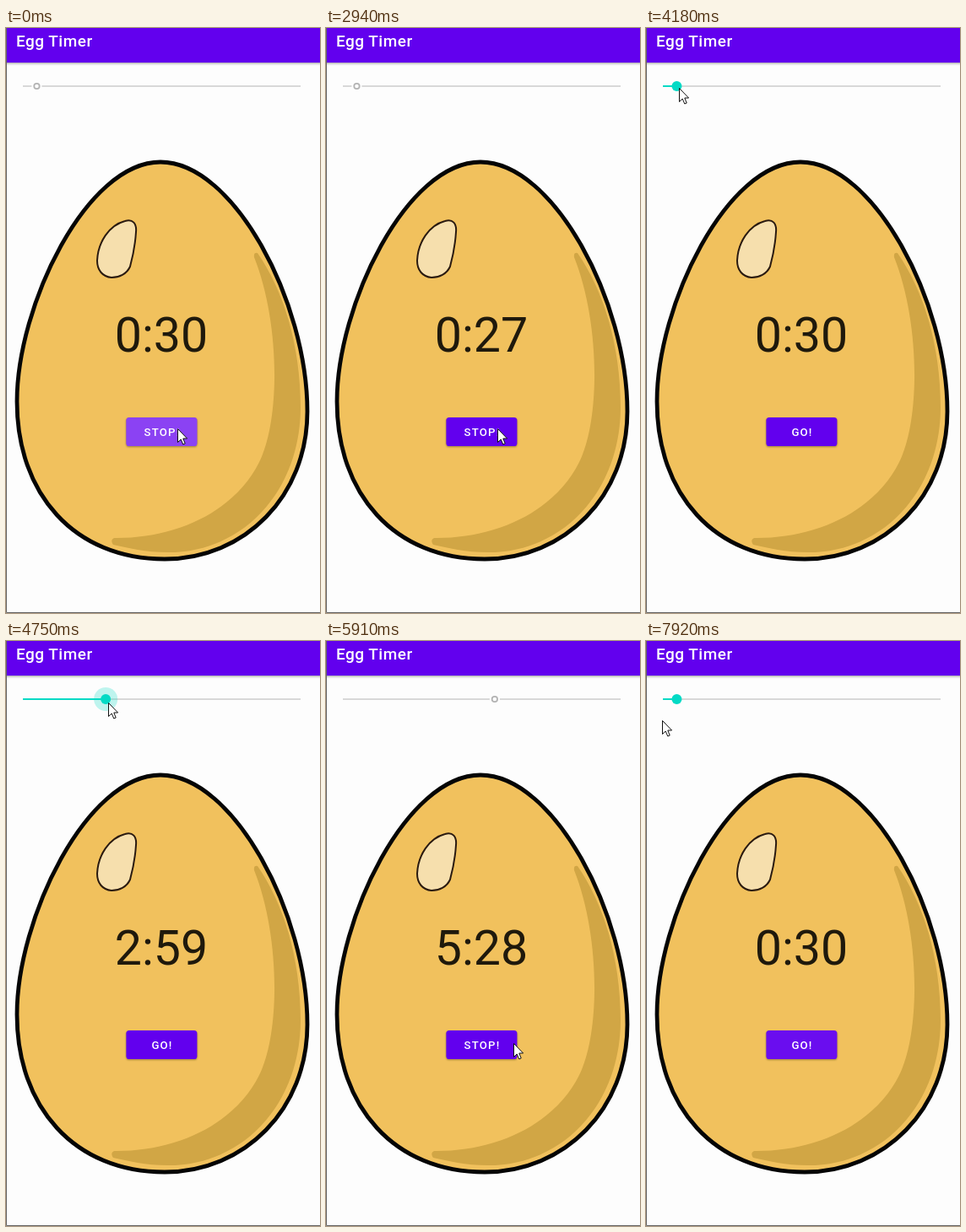
Recreate the animation shown at these times as an HTML page. Size 372 by 694 pixels, loop 8000 ms.

```html
<!DOCTYPE html>
<html lang="en">
<head>
<meta charset="utf-8">
<title>Egg Timer</title>
<style>
  html, body { margin: 0; width: 100%; height: 100%; overflow: hidden; background: #fdfdfd; }
  svg { display: block; width: 372px; height: 694px; }
  text { font-family: Roboto, sans-serif; }
  .title { font-size: 19px; font-weight: 500; letter-spacing: .026em; fill: #fff; }
  .time { font-size: 57.3px; fill: #1f190c; }
  .label { font-size: 13.2px; font-weight: 500; letter-spacing: .0893em; fill: #fff; }
  .bar { filter: drop-shadow(0 1px 1.5px rgba(0, 0, 0, .4)); }
  .button { filter: drop-shadow(0 1.5px 1.2px rgba(0, 0, 0, .35)); }
</style>
</head>
<body>
<svg viewBox="0 0 372 694">
  <defs>
    <clipPath id="buttonClip"><rect x="142.4" y="462" width="84" height="34" rx="3.6"/></clipPath>
  </defs>
  <rect width="372" height="694" fill="#fdfdfd"/>
  <rect class="bar" x="-5" y="-5" width="382" height="46" fill="#6200ee"/>
  <path d="M.5 0V693.5H372" fill="none" stroke="#666"/>
  <text class="title" x="12" y="22">Egg Timer</text>

  <g stroke-width="2">
    <path id="track" stroke="#d8d8d8"/>
    <path id="progress" stroke="#03dac5"/>
  </g>
  <circle id="halo" cy="69" r="14" fill="#03dac5" opacity=".25"/>
  <circle id="thumb" cy="69"/>

  <path fill="#f1c15d" stroke="#050505" stroke-width="4.8"
    d="M183 159C270 159 357 325 357 455C357 555 283 630 188 630C81 630 13 553 13 443C13 330 95 159 183 159Z"/>
  <path fill="#d1a645"
    d="M294 272Q293 266 298 267C328 310 349 375 349 450C349 545 285 622 192 622C165 622 145 617 127 613Q123 607 128 605C200 606 270 575 300 515C325 465 325 350 294 272Z"/>
  <path fill="#f6dfad" stroke="#2a1a10" stroke-width="2"
    d="M141 229C150 226 155 232 154 242C153 258 150 272 147 283C143 292 134 296 125 296C114 295 108 287 108 276C109 254 122 234 141 229Z"/>

  <text class="time" id="time" x="184" y="383.5" text-anchor="middle"></text>

  <rect class="button" x="142.4" y="462" width="84" height="34" rx="3.6" fill="#6200ee"/>
  <g clip-path="url(#buttonClip)" fill="#fff">
    <rect id="glow" x="142" y="462" width="85" height="35"/>
    <circle id="ripple" cx="200" cy="483" opacity=".22"/>
  </g>
  <text class="label" id="label" x="185" y="484.2" text-anchor="middle"></text>

  <path id="cursor" fill="#fff" stroke="#111" stroke-width="1" stroke-linejoin="round"
    d="M.5 .5V16.5L4.2 13L6.8 19L9.2 18L6.8 12H11.6Z"/>
</svg>
<script>
const LOOP = 8000;
const STEP = 138;        // the screen refreshes in coarse steps
const SECOND = 1040;     // one countdown tick
const DRAG = { from: 4480, to: 4900 };
const PRESSES = [-276, 3210, 5170, 7350];
const RUNS = [
  { from: -215, to: 3348 },
  { from: 5298, to: 7488 }
];
const MOVES = [
  { start: 0, steps: 1, x: 203, y: 475 },
  { start: 3348, steps: 5, x: 16, y: 36 },
  { start: 4038, steps: 2, x: 39, y: 71 },
  { start: DRAG.from, steps: 4, x: 202.9, y: 74 },
  { start: 5032, steps: 1, x: 239, y: 510 },
  { start: 5160, steps: 2, x: 203, y: 482 },
  { start: 5600, steps: 2, x: 239, y: 476 },
  { start: 5900, steps: 2, x: 205, y: 477 },
  { start: 6370, steps: 1, x: 192, y: 477 },
  { start: 6500, steps: 2, x: 194, y: 478 },
  { start: 7350, steps: 5, x: 19, y: 94 }
];

const el = id => document.getElementById(id);
const [track, progress, halo, thumb, time, glow, ripple, label, cursor] =
  ['track', 'progress', 'halo', 'thumb', 'time', 'glow', 'ripple', 'label', 'cursor'].map(el);

const set = (node, attrs) => {
  for (const name in attrs) node.setAttribute(name, attrs[name]);
};
const within = (span, t) => t >= span.from && t < span.to;
const stepsSince = (start, t) => Math.floor((t - start) / STEP) + 1;
const ease = p => p * p * (3 - 2 * p);
const clock = s => Math.floor(s / 60) + ':' + String(s % 60).padStart(2, '0');

function pointerAt(t) {
  const i = MOVES.findLastIndex(move => move.start <= t);
  const to = MOVES[i];
  const from = MOVES[Math.max(i - 1, 0)];
  const p = ease(Math.min(stepsSince(to.start, t) / to.steps, 1));
  return { x: from.x + (to.x - from.x) * p, y: from.y + (to.y - from.y) * p };
}

// The thumb follows the pointer while dragged, and stopping resets it.
function settingAt(t) {
  if (t < DRAG.from || t >= RUNS[1].to) return 30;
  const { x } = pointerAt(Math.min(t, DRAG.to));
  return Math.round((x - 23) / 329 * 600);
}

function drawSlider(x, disabled, held) {
  const gap = disabled ? 6 : 0;
  set(track, { d: `M20 69H${x - gap}M${x + gap} 69H349` });
  set(progress, { d: disabled ? '' : `M20 69H${x}` });
  set(halo, { cx: x, visibility: held ? 'visible' : 'hidden' });
  set(thumb, disabled
    ? { cx: x, r: 3.2, fill: '#fdfdfd', stroke: '#b3b3b3', 'stroke-width': 1.8 }
    : { cx: x, r: 6, fill: '#03dac5', stroke: 'none' });
}

// A press brightens for three steps behind a growing ripple, then fades.
function drawPress(t) {
  const n = stepsSince(PRESSES.findLast(press => press <= t), t);
  set(glow, { opacity: .26 * Math.max(0, Math.min(n / 3, (5.5 - n) / 2.5)) });
  set(ripple, { r: n < 3 ? 20 * n : 0 });
}

function draw(t) {
  const run = RUNS.find(span => within(span, t));
  const setting = settingAt(t);
  const elapsed = run ? Math.floor((t - run.from) / SECOND) : 0;
  const { x, y } = pointerAt(t);
  drawSlider(20 + setting / 600 * 329, run, within(DRAG, t));
  drawPress(t);
  time.textContent = clock(setting - elapsed);
  label.textContent = run ? 'STOP!' : 'GO!';
  set(cursor, { transform: `translate(${Math.round(x)} ${Math.round(y)})` });
}

const start = performance.now();
function frame() {
  draw((performance.now() - start) % LOOP);
  requestAnimationFrame(frame);
}
frame();
</script>
</body>
</html>
```
